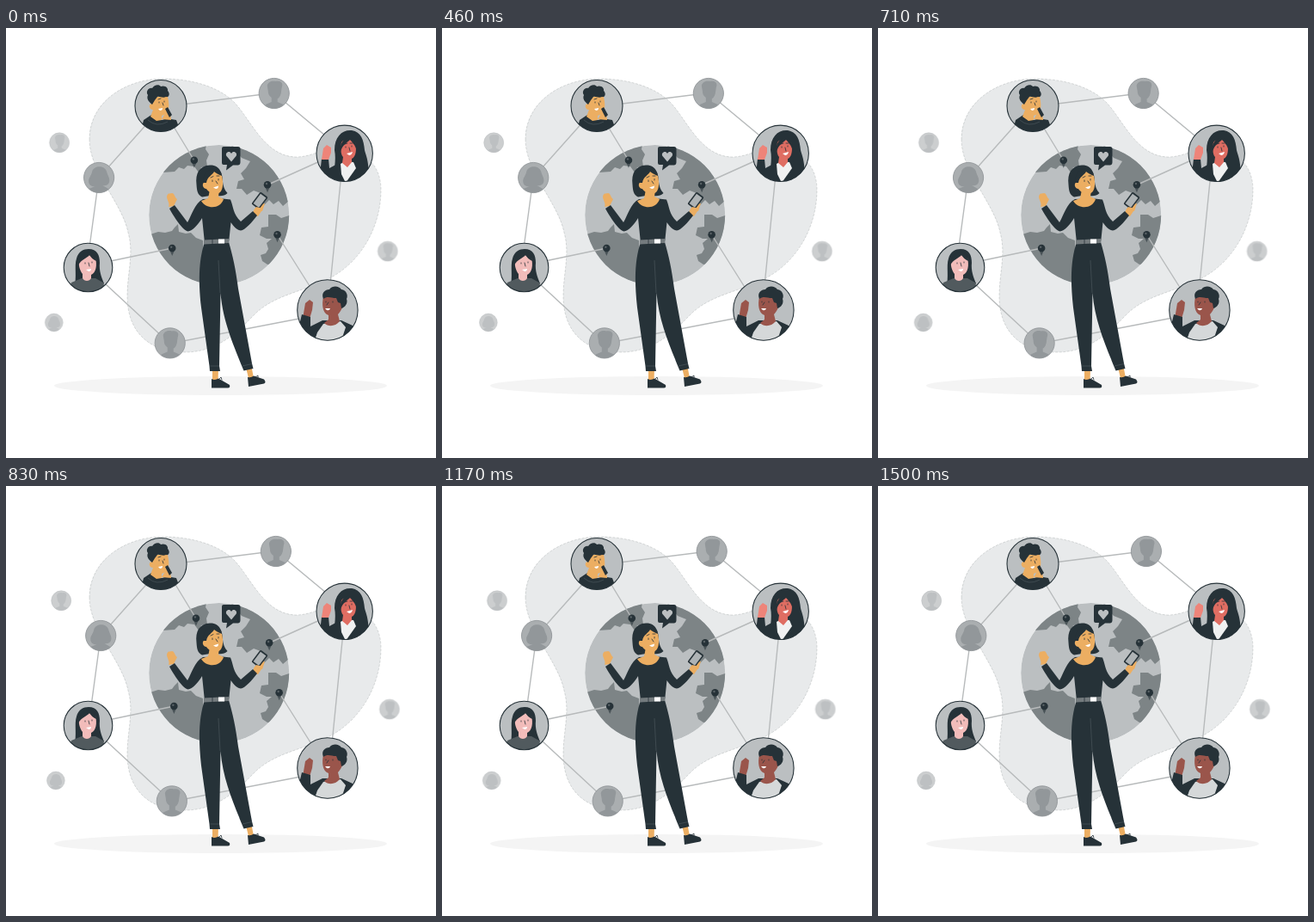
Recreate the animation shown at these times as an HTML page. Size 500 by 500 pixels, loop 1540 ms.

```html
<!DOCTYPE html>
<html lang="en">
<head>
<meta charset="utf-8">
<title>Connected people</title>
<style>
  html, body { margin: 0; width: 100%; height: 100%; overflow: hidden; background: #fff; }
  svg { display: block; width: 100%; height: 100%; }
  .ink { fill: #263238; }
  .skin { fill: #ecae62; }
  .rose { fill: #f2bcba; }
  .coral { fill: #df6d62; }
  .fist { fill: #ee8479; }
  .brown { fill: #9a554b; }
  .pale { fill: #f0f1f1; }
  .land { fill: #7d8486; }
  .disc { fill: #bbbfc1; }
  .ring { fill: none; stroke: #263238; stroke-width: 1.1; }
  .line { fill: none; stroke: #263238; stroke-width: .8; stroke-linecap: round; }
  .seam { fill: none; stroke: #4a555b; stroke-width: .7; }
  .smile { fill: #fff; }
  .links { fill: none; stroke: #b7babb; stroke-width: 1.4; }
</style>
</head>
<body>
<svg viewBox="0 0 500 500">
  <defs>
    <clipPath id="globe"><circle cx="247.7" cy="217.5" r="81.5"/></clipPath>
    <clipPath id="unit"><circle r="17.5"/></clipPath>
    <clipPath id="clipA"><circle cx="180" cy="90.5" r="30"/></clipPath>
    <clipPath id="clipB"><circle cx="393.7" cy="145.8" r="32.7"/></clipPath>
    <clipPath id="clipC"><circle cx="95.5" cy="278.5" r="28.3"/></clipPath>
    <clipPath id="clipD"><circle cx="373.9" cy="328" r="35.2"/></clipPath>
    <g id="short">
      <circle r="17.6" fill="#aaaeb0" stroke="#92979a" stroke-width=".9"/>
      <path clip-path="url(#unit)" fill="#92979a" d="M-8-9C-7-14-2-15 2-14C8-15 11-12 9-7L8 0C7 4 5 6 4 6V10L11 13V19H-10V13L-3 10V5C-6 3-7 0-7-3Z"/>
    </g>
    <g id="long">
      <circle r="17.6" fill="#aaaeb0" stroke="#92979a" stroke-width=".9"/>
      <path clip-path="url(#unit)" fill="#92979a" d="M-8-7C-6-14 6-15 9-7C10-2 13 0 12 5C11 9 7 10 4 9L11 13V19H-12V13L-4 10C-8 11-12 9-12 4C-12 0-9-2-8-7Z"/>
    </g>
    <g id="pin">
      <path class="ink" d="M-3 2L0 9L3 2Z" opacity=".6"/>
      <circle class="ink" r="4.3"/>
      <circle cx="-1" cy="-1.3" r="1.2" fill="#596266"/>
    </g>
  </defs>

  <path fill="#e8eaeb" stroke="#263238" stroke-opacity=".4" stroke-width=".4" stroke-dasharray="3 1.5" d="M97 130C97 85 140 59 183 59C215 59 247 68 265 86C284 105 300 149 337 150C354 150 362 142 385 141C418 141 436 160 436 188C436 228 416 268 380 289C345 308 312 309 287 335C264 360 240 377 208 377C165 377 141 352 141 312C141 285 149 262 142 238C136 205 97 167 97 130Z"/>
  <ellipse cx="249.5" cy="416" rx="193.5" ry="11" fill="#f4f4f4"/>

  <g clip-path="url(#globe)">
    <circle class="disc" cx="247.700" cy="217.500" r="81.500"/>
    <g class="land">
      <path d="M182 168l10-12 9-8 10-6 14-5 8-1-1 5 4 6-3 7 1 7-7 1-3 6-5-7-8-1-4 4-6-2-5 5z"/>
      <path d="M262 137l14 2 18 8 18 15 10 17 7 22-7 6-5-6-6 4-5-5-6 6-6-8 2-6-8-3-8 5-6-7-6 0 2-9 7-2-4-7 6-6 5-8-10-4z"/>
      <path d="M164 241l13-4 8 1 8-2 3-4 4-4 1 9 8 2 6-1 6 6 8 3 2 54-22-4-20-10-18-18z"/>
      <path d="M332 217l-12 4-6-4-9 0 0 14-8 1-2 9 8 4 6 0-6 5 2 7-3 5-6 2 2 7 6 4 12-2 14-12 12-24z"/>
    </g>
  </g>

  <g id="drift">
    <path class="links" d="M172 93L311.700 75.500L402 150.500M172 102.500L108.200 174L96 264M86 270L190.700 367L372 332M392.500 146L375 320M219 154L185 98M304 182.500L385 146M193.500 256L98 276M315.700 240.500L369 325"/>
    <use href="#short" x="311.900" y="76"/>
    <use href="#long" x="108.300" y="174"/>
    <use href="#short" x="190.900" y="366.400"/>
    <g opacity=".6">
      <use href="#short" transform="translate(62.200 133.300) scale(.65)"/>
      <use href="#short" transform="translate(443.900 259.600) scale(.65)"/>
      <use href="#long" transform="translate(55.900 342.500) scale(.59)"/>
    </g>
    <use href="#pin" x="219" y="153.700"/>
    <use href="#pin" x="304.200" y="182.300"/>
    <use href="#pin" x="193.400" y="256"/>
    <use href="#pin" x="315.700" y="240.300"/>
  </g>

  <g clip-path="url(#clipA)">
    <circle class="disc" cx="180" cy="90.500" r="30"/>
    <path class="ink" d="M156 123L160 107L169 101C174 107 181 109 186 105L198 107L204 123Z"/>
    <path class="skin" d="M170 80H188C190 88 190 96 186 100L181 102V107L175 108L168 103L171 95C166 95 165 88 170 88Z"/>
    <path class="seam" d="M165 107Q175 116 188 109"/>
    <path class="ink" d="M170 89C166 86 163 82 165 78C162 74 166 69 170 70C172 66 178 65 180 68C185 66 189 70 188 73C191 76 190 81 186 80C182 82 179 79 176 80L173 84Z"/>
    <path class="skin" d="M181 106L186 98L191 99L192 107Z"/>
    <path class="ink" d="M185 94L188 92L193 101L190 104Z"/>
    <path class="line" d="M178 86v1M184 85v1M177 83l3-1M182 87l1 3"/>
    <path class="smile" d="M177 94L182 93Q182 96 179 96Z"/>
  </g>
  <circle class="ring" cx="180" cy="90.500" r="30"/>

  <g clip-path="url(#clipB)">
    <circle class="disc" cx="393.700" cy="145.800" r="32.700"/>
    <path class="ink" d="M382 142C382 126 391 118 402 119C413 121 416 130 417 142C419 150 423 156 421 180H385C378 170 385 158 382 142Z"/>
    <path class="ink" d="M365 170L367 152L375 152L376 163L389 156L407 155L421 161L424 180H366Z"/>
    <path class="pale" d="M389 158L394 155L404 156L407 163L395 180L390 170Z"/>
    <path class="coral" d="M390 133C393 129 402 128 406 133C408 141 407 150 402 152V156L397 162L391 157L392 150C389 147 389 139 390 133Z"/>
    <path class="ink" d="M389 144C387 134 394 126 402 128C406 129 408 135 407 140C405 135 402 132 400 130C397 133 391 136 389 144Z"/>
    <path class="fist" d="M367 153L369 140L373 136L378 139L378 145L375 153Z"/>
    <path class="line" d="M395 138v1M402 137v1M394 135l3-1M400 134l3 0M399 139l1 4"/>
    <path class="smile" d="M396 146L403 144Q402 148 399 148Z"/>
  </g>
  <circle class="ring" cx="393.700" cy="145.800" r="32.700"/>

  <g clip-path="url(#clipC)">
    <circle class="disc" cx="95.500" cy="278.500" r="28.300"/>
    <path class="ink" d="M79 302C83 290 79 277 82 268C84 260 90 257 96 257C106 257 109 264 109 273C108 282 111 290 114 297L108 303Z"/>
    <path d="M70 310L76 296L88 291H104L113 296L117 310Z" fill="#515a5e"/>
    <path class="rose" d="M85 270C89 264 99 262 104 267C106 276 105 284 99 287V291C97 295 91 295 89 291V286C86 282 84 276 85 270Z"/>
    <path class="ink" d="M84 276C83 267 89 261 96 261C102 261 105 265 105 271C101 269 99 267 97 264C94 268 87 269 84 276Z"/>
    <path class="line" d="M92 273v1M100 272v1M96 273l1 4"/>
    <path class="smile" d="M93 281L99 280Q99 283 96 283Z"/>
  </g>
  <circle class="ring" cx="95.500" cy="278.500" r="28.300"/>

  <g clip-path="url(#clipD)">
    <circle class="disc" cx="373.900" cy="328" r="35.200"/>
    <path class="brown" d="M345 338L348 320L353 316L357 319L356 328L353 338Z"/>
    <path class="ink" d="M338 358L344 333L354 336L354 347L368 340L390 340L403 346L409 366H342Z"/>
    <path fill="#d5d8d9" d="M369 344L389 341L395 348L389 366H358L362 354Z"/>
    <path class="brown" d="M369 313C374 307 387 307 391 314C394 321 390 329 386 333L388 341C383 347 375 348 370 343L375 339V334C368 332 367 321 369 313Z"/>
    <path class="ink" d="M369 315C366 308 371 304 376 304C380 299 387 300 390 304C396 305 398 311 396 315C398 320 394 325 390 326L389 320L386 319L384 314C378 314 374 311 369 315Z"/>
    <path class="line" d="M372 318v1M380 318v1M375 319l-2 3"/>
    <path class="smile" d="M371 326L377 326Q376 329 373 328Z"/>
  </g>
  <circle class="ring" cx="373.900" cy="328" r="35.200"/>

  <path class="ink" d="M253 138H270Q272 138 272.500 140V156Q272.500 159 270 159.500H264L256 165.500L257 159H253Q251 159 251 157V140Q251 138 253 138Z"/>
  <path fill="#bbbfc1" d="M262 155.500L256.500 149C254 145 260 141.500 262 146C264 141.500 270 145 267.500 149Z"/>

  <path class="skin" d="M240 397H247L246.500 410H240ZM279 395L285.500 394L288 407H282Z"/>
  <path class="ink" d="M239 408Q243 410 247 407.500L260 415Q261 418.500 258 418.500H239ZM281 406Q285 407 288 404.500L300 408.500Q303 412 300 413.500L282 417Z"/>
  <path class="line" d="M247 409l3-3 1 3M290 406l3-2 0 3"/>
  <path class="ink" d="M231 249H259C264 266 267 280 270 303L286 390L287.500 396L276.500 398.500C266 372 252 342 249.500 308L248 393L249 399H237L236.500 393L227 325C223 289 225 267 231 249Z"/>
  <path class="seam" d="M237.500 393H248M275 393L286 390.500M249 308L247 270"/>
  <path class="skin" d="M189 208C191 204 187 200 187 196C188 191 191 193 193 192C196 192 196 197 199 199L195 207Z"/>
  <path class="skin" d="M286 217L289 210L295 205L301 204L299 210L293 219Z"/>
  <path class="ink" d="M229 199L252 198.500L261 199.500C264 206 264 217 273 225L287 213L292 218C286 226 278 235 273 235.500C267 235 263 228 261.500 226L259 250H231L228 221C223 229 217 236 211.500 236.500C205 235 195 219 190 210L196 206L211 226C216 218 219 204 229 199Z"/>
  <path class="ink" d="M221.500 182C220 169 225 160 237 159.500C249 159 252 170 252 179C253 186 255 189 257.500 192C254 196 247 196 243 194L228 196.500C223 194 222 190 221.500 182Z"/>
  <path class="skin" d="M227 201L235 198L237 188H248L247 196L253 199C249 211 233 211 227 201Z"/>
  <path class="skin" d="M232 172C235 167 246 165 250 169C253 177 253 187 249 191C244 195 236 192 233 187C229 187 227 181 231 179Z"/>
  <path class="ink" d="M230 180C228 170 234 164 242 164C247 164 251 167 251 172C247 170 244 169 242 167C240 171 234 173 233 180Z"/>
  <path class="line" d="M240 177v1.500M247 175.500v1.500M238 174l3-1.500M245 172l3 0M244 178l2 3"/>
  <path class="smile" d="M241 185.500L247 183.500Q247 187 244 187Z"/>
  <path fill="#747b7e" d="M230 246.500L259 245V250L230 251.500Z"/>
  <path class="line" d="M240 246v5"/>
  <rect x="247" y="245.500" width="7" height="5" fill="#fff"/>
  <g transform="translate(295 200.700) rotate(37)">
    <rect class="ink" x="-5.500" y="-8.800" width="11" height="17.600" rx="1.500"/>
    <rect x="-4" y="-7" width="8" height="14" fill="#aeb3b5"/>
  </g>
  <path class="skin" d="M291 208l8 2-1 3-8-1z"/>
</svg>
<script>
  const LOOP = 1540, FPS = 24, LAST = 36;
  const shake = [0, -1, 2, -4, 4, -4, 4, -4, 2, -1, 0];
  const drift = document.getElementById('drift');

  function offset(ms) {
    const step = Math.min(LAST, Math.floor((ms + 5) * FPS / 1000));
    const pos = Math.min(1, (step / FPS + 0.028) / 1.5) * 10;
    const i = Math.min(9, Math.floor(pos));
    return shake[i] + (shake[i + 1] - shake[i]) * (pos - i);
  }

  const start = performance.now();
  function draw(now) {
    const ms = Math.max(0, now - start) % LOOP;
    drift.setAttribute('transform', `translate(${offset(ms).toFixed(3)} 0)`);
    requestAnimationFrame(draw);
  }
  draw(start);
</script>
</body>
</html>
```
